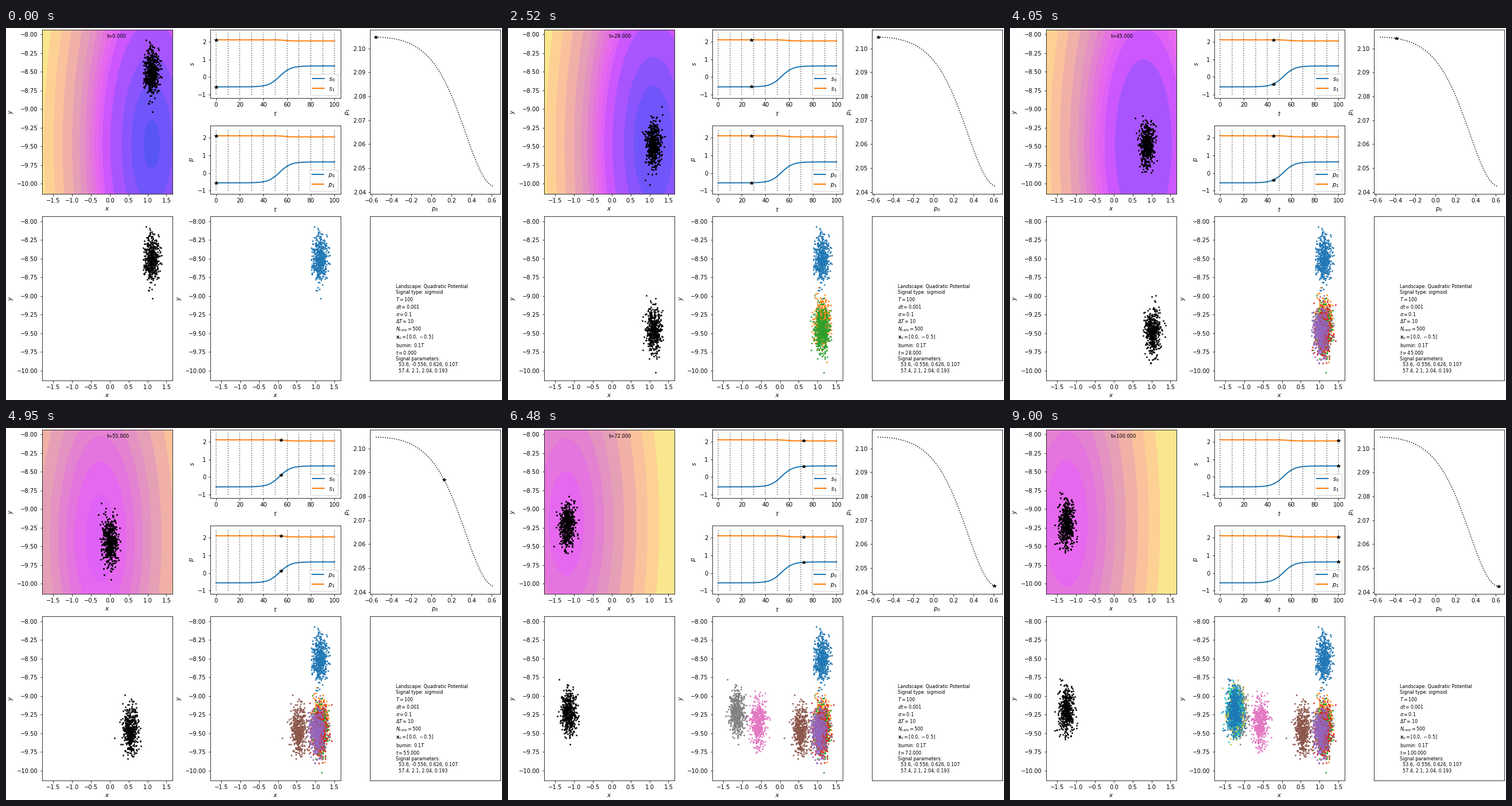
Animation, 864 px wide and 648 px high, one loop 9.09 s. Source, as a matplotlib script:

```python
import numpy as np
import matplotlib.pyplot as plt
from matplotlib.animation import FuncAnimation

W, H = 864, 648
T_END, SNAP, N_CELLS, SIGMA = 100, 10, 500, 0.1
STIFF = np.array([1 / 2, 2 / 9])
XLIM, YLIM = (-1.795, 1.659), (-10.134, -7.935)

# Band edges are heights above the lowest potential of the whole run.
PHI_LOW = -10.276
EDGES = [-1, 0.013, 0.075, 0.16, 0.303, 0.43, 0.5, 0.58, 0.67, 0.78,
         0.92, 1.12, 1.4, 1.7, 2.05, 9]
BANDS = ["#5955f5", "#7055fa", "#8a55fc", "#a855ff", "#cb57fd", "#de62f5",
         "#e668ee", "#e474de", "#e382d0", "#e492c2", "#e5a0b6", "#f0b0a8",
         "#fac29c", "#fdd193", "#fae68e"]

INFO = "\n".join([
    "Landscape: Quadratic Potential",
    "Signal type: sigmoid",
    "$T=100$",
    "$dt=0.001$",
    r"$\sigma=0.1$",
    r"$\Delta T=10$",
    "$N_{cells}=500$",
    r"$\mathbf{x}_0=[0.0, -0.5]$",
    "burnin: $0.1T$",
    "$t=%.3f$",
    "Signal parameters:",
    "  53.6, -0.556, 0.626, 0.107",
    "  57.4, 2.1, 2.04, 0.193",
])


def sigmoid(t, mid, start, end, rate):
    return start + (end - start) * 0.5 * (1 + np.tanh(rate * (t - mid)))


def signal(t):
    return np.array([sigmoid(t, 53.6, -0.556, 0.626, 0.107),
                     sigmoid(t, 57.4, 2.1047, 2.0424, 0.193)])


def simulate(substeps=20):
    """Cells drifting down the tilted bowl, one state per time unit."""
    rng = np.random.default_rng(7)
    dt = 1 / substeps
    cells = np.tile([0.0, -0.5], (N_CELLS, 1))
    decay = np.exp(-STIFF * dt)
    noise = SIGMA * np.sqrt((1 - decay ** 2) / (2 * STIFF))
    states = []
    for step in range(-SNAP * substeps, T_END * substeps + 1):
        if step >= 0 and step % substeps == 0:
            states.append(cells.copy())
        rest = -signal(max(step * dt, 0)) / STIFF
        cells = rest + (cells - rest) * decay
        cells += noise * rng.standard_normal(cells.shape)
    return states


def cell_axes(spot):
    ax = fig.add_subplot(spot)
    ax.set(xlim=XLIM, ylim=YLIM, xlabel="$x$", ylabel="$y$")
    return ax


def dots(ax, color, alpha):
    return ax.scatter([], [], s=4, color=color, alpha=alpha, zorder=3)


def star(ax):
    return ax.plot([], [], "k*", ms=6, zorder=5)[0]


def signal_plot(ax, name):
    for i in range(2):
        ax.plot(times, curve[i], lw=2, label=f"${name}_{i}$")
    ax.vlines(np.arange(0, T_END + 1, SNAP), -1, 2.5, colors="k",
              linestyles=":", linewidth=1.5, alpha=0.6)
    ax.set(xlim=(-5, 105), ylim=(-1.175, 2.675), xlabel="$t$",
           ylabel=f"${name}$")
    ax.legend(loc="lower right")
    return star(ax)


def split_cell(upper, share=0.415):
    """Shrink the axes to the top of its cell and add a twin at the bottom."""
    box = upper.get_position()
    height = share * box.height
    upper.set_position([box.x0, box.y1 - height, box.width, height])
    return fig.add_axes([box.x0, box.y0, box.width, height])


fig = plt.figure(figsize=(W / 72, H / 72), dpi=72, layout="constrained")
grid = fig.add_gridspec(2, 3)
times = np.linspace(0, T_END, 501)
curve = signal(times)
states = simulate()
grid_x, grid_y = np.meshgrid(np.linspace(*XLIM, 60), np.linspace(*YLIM, 60))
bowl = grid_x ** 2 / 4 + grid_y ** 2 / 9 - PHI_LOW

field = cell_axes(grid[0, 0])
field_dots = dots(field, "k", 1)
clock = field.text(0.5, 0.95, "", transform=field.transAxes, fontsize="small")

s_axes = fig.add_subplot(grid[0, 1])
s_star = signal_plot(s_axes, "s")

plane = fig.add_subplot(grid[0, 2])
plane.plot(*curve, "k:")
plane.set(xlabel="$p_0$", ylabel="$p_1$")
plane_star = star(plane)

latest_dots = dots(cell_axes(grid[1, 0]), "k", 0.8)
history = cell_axes(grid[1, 1])
history_dots = [dots(history, f"C{i % 10}", 0.8)
                for i in range(T_END // SNAP + 1)]

panel = fig.add_subplot(grid[1, 2])
panel.set(xticks=[], yticks=[])
info = panel.text(0.2, 0.05, "", transform=panel.transAxes, fontsize=8)

# Lay the grid out once, then freeze it.
fig.draw_without_rendering()
fig.set_layout_engine("none")
time_stars = [s_star, signal_plot(split_cell(s_axes), "p")]

contours = []


def update(t):
    p = signal(t)
    while contours:
        contours.pop().remove()
    contours.append(field.contourf(
        grid_x, grid_y, bowl + p[0] * grid_x + p[1] * grid_y,
        levels=EDGES, colors=BANDS, zorder=0))

    field_dots.set_offsets(states[t])
    clock.set_text(f"t={t:.3f}")
    info.set_text(INFO % t)
    for marker in time_stars:
        marker.set_data([t, t], p)
    plane_star.set_data([p[0]], [p[1]])

    last = t // SNAP
    latest_dots.set_offsets(states[last * SNAP])
    for i, cloud in enumerate(history_dots):
        cloud.set_offsets(states[i * SNAP])
        cloud.set_visible(i <= last)
    return []


anim = FuncAnimation(fig, update, frames=T_END + 1, interval=90,
                     repeat=True, repeat_delay=0)
plt.show()
```
